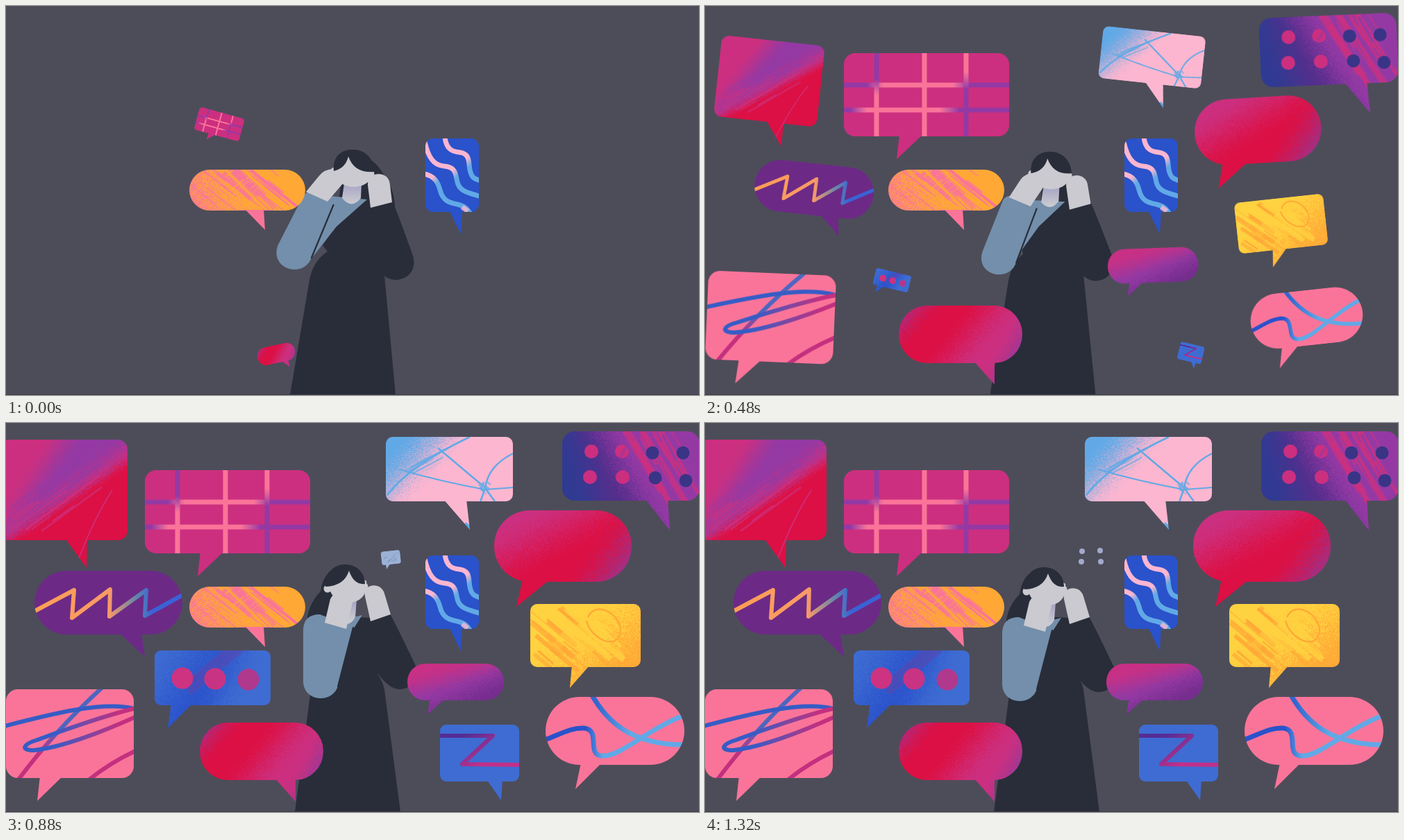
Animation, 998 px wide and 561 px high, one loop 1.36 s. Source, as an HTML page with a canvas:

```html
<!DOCTYPE html>
<html lang="en">
<head>
<meta charset="utf-8">
<title>Too many voices</title>
<style>
html, body { margin: 0; width: 100%; height: 100%; overflow: hidden; background: #4d4d59; }
canvas { display: block; }
</style>
</head>
<body>
<canvas id="stage" width="998" height="561"></canvas>
<script>
const LOOP = 1360, STEP = 40, PAD = 50;
const MAGENTA = '#cc2f7f', CRIMSON = '#dc1044', PURPLE = '#9439a4', PINK = '#fa7499', BLUE = '#3e6cd2',
  DEEP = '#2a52cb', SKY = '#61a9e6', ORANGE = '#ffa836', YELLOW = '#ffd23f', ROSE = '#fcb6d0', NAVY = '#3a3486',
  DARK = '#282d39', SKIN = '#cacad0', SLEEVE = '#738fab';
const ctx = document.getElementById('stage').getContext('2d');

let g, box; // context and bounds of the bubble being painted
let seed = 7;
const rand = () => (seed = seed * 16807 % 2147483647) / 2147483647;
const clamp = v => Math.max(0, Math.min(1, v));
const lerp = (a, b, p) => a + (b - a) * p;
const ease = p => { p = clamp(p); return p * p * (3 - 2 * p); };

function keyed(keys, t) {
  const i = keys.findIndex(k => k[0] > t);
  if (i < 0) return keys[keys.length - 1][1];
  if (i === 0) return keys[0][1];
  const [a, b] = [keys[i - 1], keys[i]];
  return lerp(a[1], b[1], (t - a[0]) / (b[0] - a[0]));
}

function disc(c, x, y, r, color) {
  c.fillStyle = color;
  c.beginPath();
  c.arc(x, y, r, 0, 7);
  c.fill();
}

// Grainy blend: nothing at the first point, full colour at the second.
function spray(color, x0, y0, x1, y1, noise = 0.55) {
  const dx = x1 - x0, dy = y1 - y0, len = dx * dx + dy * dy;
  g.fillStyle = color;
  for (let y = box.y; y < box.y + box.h + 45; y++) {
    for (let x = box.x; x < box.x + box.w; x++) {
      const d = ((x - x0) * dx + (y - y0) * dy) / len;
      const a = clamp(d + (rand() - 0.5) * noise);
      if (!a) continue;
      g.globalAlpha = a;
      g.fillRect(x, y, 1, 1);
    }
  }
  g.globalAlpha = 1;
}

function line(d, width, color, alpha = 1) {
  g.globalAlpha = alpha;
  g.lineWidth = width;
  g.strokeStyle = color;
  g.stroke(new Path2D(d));
  g.globalAlpha = 1;
}

function blend(x0, y0, x1, y1, ...stops) {
  const grad = g.createLinearGradient(x0, y0, x1, y1);
  stops.forEach(([at, color]) => grad.addColorStop(at, color));
  return grad;
}

// Dry brush marks along one direction, scattered over an area.
function brush(color, count, x, y, w, h, dx, dy, maxWidth) {
  for (let i = 0; i < count; i++) {
    const px = x + rand() * w, py = y + rand() * h, k = 0.3 + rand();
    line(`M${px} ${py}l${dx * k} ${dy * k}`, 0.5 + rand() * maxWidth, color, 0.45 + rand() * 0.5);
  }
}

// rect: x, y, w, h, radius; tail: left, right, tip x, tip y
const bubbles = [
  { rect: [-9, 24, 184, 145, 14], tail: [85, 117, 116, 209], start: 200, dir: -1, color: MAGENTA, art() {
    spray(PURPLE, 40, 56, 70, 76);
    spray(MAGENTA, 86, 82, 104, 106, 0.9);
    spray(CRIMSON, 90, 102, 98, 114, 0.8);
    brush(PURPLE, 8, -10, 120, 70, 45, 85, -62, 2);
    brush(MAGENTA, 10, 0, 135, 80, 25, 85, -62, 3);
    line('M153 97Q128 135 105 195', 1.5, MAGENTA);
  } },
  { rect: [200, 68, 238, 120, 16], tail: [280, 314, 276, 221], start: -100, dir: 1, color: MAGENTA, art() {
    const two = (y0, y1, a, b) => blend(0, y0, 0, y1, [0, a], [1, b]);
    const across = (a, b, c, d) => blend(200, 0, 438, 0, [a, PURPLE], [b, PINK], [c, PINK], [d, PURPLE]);
    line('M200 114H438', 7, across(0.14, 0.24, 0.66, 0.76));
    line('M200 150H438', 7, across(0.04, 0.14, 0.58, 0.7));
    line('M247 68V188', 7, two(105, 128, PURPLE, PINK));
    line('M316 68V188', 7, PINK);
    line('M376 68V188', 7, two(95, 120, PINK, PURPLE));
  } },
  { rect: [547, 20, 183, 93, 10], tail: [630, 663, 668, 154], start: 200, dir: -1, color: ROSE, art() {
    spray(SKY, 608, 72, 572, 38);
    line('M549 104Q580 62 668 20', 2.5, SKY);
    line('M622 36L692 95', 2.5, SKY);
    line('M566 67Q625 84 690 96L730 93', 2, SKY);
    line('M690 94Q694 62 730 44M690 94L704 113M690 94L683 114', 2.5, SKY);
    brush(SKY, 9, 570, 55, 30, 20, 45, -24, 2);
    brush(SKY, 12, 680, 85, 14, 12, 8, 7, 5);
    line('M660 146L672 156', 8, SKY);
  } },
  { rect: [801, 12, 198, 100, 18], tail: [920, 953, 956, 155], start: 75, dir: -1, color: '#303a92', art() {
    spray('#562d8c', 815, 70, 865, 55);
    spray(PURPLE, 868, 75, 905, 55);
    line('M912 5L985 125', 9, MAGENTA, 0.8);
    brush(MAGENTA, 14, 890, 0, 65, 30, 50, 84, 7);
    brush(PURPLE, 6, 920, 10, 60, 30, 40, 75, 4);
    [[843, 41], [887, 41], [841, 78], [888, 78]].forEach(([x, y]) => disc(g, x, y, 10, MAGENTA));
    [[931, 43], [975, 43], [935, 79], [979, 83]].forEach(([x, y]) => disc(g, x, y, 9.5, NAVY));
    line('M884 50L894 34', 4, PURPLE, 0.6);
  } },
  { rect: [703, 126, 198, 103, 51], tail: [744, 783, 735, 265], start: 145, dir: 1, color: CRIMSON, art() {
    spray(MAGENTA, 808, 182, 780, 128);
    spray('#8c3a9c', 848, 187, 902, 226);
  } },
  { rect: [41, 213, 213, 92, 46], tail: [162, 195, 200, 337], start: 200, dir: -1, color: '#6c2a86', art() {
    line('M38 273L98 241L95 281L150 240L149 279L202 241L200 278L258 246', 6,
      blend(41, 0, 254, 0, [0, '#ff9e55'], [0.5, '#fa9a66'], [0.7, '#5b84b0'], [0.8, '#3a62d6']));
  } },
  { rect: [264, 236, 167, 59, 29.5], tail: [343, 371, 373, 323], start: -999, dir: 1, color: ORANGE, art() {
    spray(PINK, 322, 250, 250, 285, 1);
    brush(PINK, 14, 312, 230, 22, 12, 60, 58, 7);
    brush(PINK, 26, 265, 225, 115, 40, 46, 36, 2.6);
    brush(ORANGE, 18, 265, 235, 90, 40, 30, -26, 1.8);
    line('M352 236L420 290', 4, PINK);
    g.fillStyle = PINK;
    g.fillRect(335, 294, 50, 30);
  } },
  { rect: [604, 191, 77, 106, 11], tail: [638, 657, 655, 329], start: -999, dir: 1, color: DEEP, art() {
    const fade = (x, y) => blend(x - 4, y - 4, x + 4, y + 4, [0, ROSE], [1, SKY]);
    line('M632 189C634 207 643 210 653 211C671 213 665 230 669 240C672 250 677 249 685 253', 7, fade(667, 224));
    line('M603 196C608 218 616 230 631 231C651 232 647 248 651 257C655 268 668 270 685 275', 7, fade(648, 240));
    line('M602 242C617 245 622 254 625 265C629 282 640 284 650 286C660 288 664 292 669 300', 7, fade(619, 250));
    line('M657 290L665 296', 7, ROSE, 0.8);
  } },
  { rect: [755, 261, 159, 91, 10], tail: [815, 841, 812, 382], start: 200, dir: 1, color: YELLOW, art() {
    spray(ORANGE, 840, 300, 880, 350, 1.2);
    brush(ORANGE, 22, 750, 265, 70, 70, 52, 44, 9);
    brush(YELLOW, 14, 780, 255, 60, 50, 60, 50, 8);
    brush(YELLOW, 8, 840, 275, 25, 20, 30, 26, 8);
    line('M838 280C850 255 885 275 885 300C882 330 842 312 836 285', 2.5, ORANGE);
  } },
  { rect: [214, 328, 167, 79, 9], tail: [238, 269, 233, 440], start: 310, dir: 1, color: BLUE, art() {
    spray(DEEP, 215, 350, 275, 390);
    spray(BLUE, 285, 380, 330, 400);
    line('M260 385L335 322', 20, '#5b45ac', 0.55);
    [[254, 368, '#cd3380'], [301, 369, '#c93383'], [349, 370, '#b0388d']].forEach(d => disc(g, d[0], d[1], 15.5, d[2]));
  } },
  { rect: [578, 347, 139, 53, 26], tail: [611, 633, 607, 420], start: 130, dir: 1, color: '#c73085', art() {
    spray(PURPLE, 640, 352, 648, 380);
    spray('#732c8c', 650, 376, 664, 408);
  } },
  { rect: [0, 384, 184, 128, 17], tail: [49, 82, 45, 545], start: 75, dir: 1, color: PINK, art() {
    const ink = '#365cc5', plum = '#c4307f';
    line('M138 382Q72 442 18 514', 6, blend(80, 440, 50, 480, [0, '#4d66c0'], [1, plum]));
    line('M-2 437C60 421 140 400 184 412', 6, ink);
    line('M186 424C140 445 80 468 40 472C20 472 25 463 45 457C90 440 150 420 184 412', 6,
      blend(70, 0, 165, 0, [0, ink], [1, plum]));
    line('M186 473Q150 490 120 514', 6, plum);
  } },
  { rect: [279, 432, 178, 83, 41], tail: [387, 417, 417, 546], start: -220, dir: -1, color: CRIMSON, art() {
    spray(MAGENTA, 362, 462, 398, 492);
    spray('#8c3a9c', 430, 482, 462, 500);
    spray('#9439a0', 316, 452, 282, 422);
  } },
  { rect: [625, 435, 114, 82, 9], tail: [692, 715, 713, 544], start: 310, dir: 1, color: BLUE, art() {
    line('M623 451H701L657 492L741 493', 6, blend(660, 452, 685, 492, [0, '#562d96'], [1, '#c0308a']));
  } },
  { rect: [777, 395, 200, 98, 49], tail: [828, 858, 820, 528], start: 200, dir: 1, color: PINK, art() {
    line('M776 457C800 448 815 439 832 440C858 442 835 478 858 480C885 482 920 443 978 421', 7,
      blend(835, 0, 860, 0, [0, DEEP], [1, SKY]));
    line('M843 391C865 430 900 465 979 464', 7, blend(850, 0, 900, 0, [0, '#3266cf'], [1, SKY]));
  } },
  { rect: [539, 181, 34, 24, 4], tail: [546, 555, 546, 213], start: 600, end: 1220, dir: 1, color: '#9cb1d6', art() {
    brush('#7488b2', 6, 539, 186, 24, 18, 16, -9, 1);
  } }
];

for (const b of bubbles) {
  const [x, y, w, h, r] = b.rect, [left, right, tipX, tipY] = b.tail;
  const canvas = document.createElement('canvas');
  canvas.width = w + 2 * PAD;
  canvas.height = h + 2 * PAD;
  g = canvas.getContext('2d');
  g.translate(PAD - x, PAD - y);
  g.lineJoin = 'round';
  box = { x, y, w, h };
  const shape = new Path2D();
  shape.roundRect(x, y, w, h, r);
  shape.moveTo(left, y + h - 3);
  shape.lineTo(right, y + h - 3);
  shape.lineTo(tipX, tipY);
  shape.closePath();
  g.fillStyle = b.color;
  g.fill(shape);
  g.globalCompositeOperation = 'source-atop';
  b.art();
  b.canvas = canvas;
  b.pivot = [(left + right) / 2, y + h - 4];
}

const SIZE = [[0, 0], [45, 0.25], [150, 0.31], [230, 0.31], [285, 0.86], [400, 1]];
const TILT = [[0, 18], [80, 16], [150, 14], [230, 12], [285, -8], [400, 2.5], [560, 0]];

function drawBubble(b, t) {
  const age = t - b.start, size = keyed(SIZE, age);
  if (size <= 0 || t >= (b.end || LOOP)) return;
  const [px, py] = b.pivot;
  ctx.save();
  ctx.translate(px, py);
  ctx.rotate(b.dir * keyed(TILT, age) * Math.PI / 180);
  ctx.scale(size, size);
  ctx.drawImage(b.canvas, b.rect[0] - PAD - px, b.rect[1] - PAD - py);
  ctx.restore();
}

// Each body part: the path while covering both ears, then while listening.
const parts = {
  hair: ['M490 212Q528 212 545 245Q560 265 560 292L478 292L482 258Z',
    'M490 206Q458 206 453 243Q434 262 433 290L500 292L496 258Z'],
  dress: ['M409 561L437 395Q442 368 463 354L456 345L476 315L518 278L552 282L546 330Q545 370 545 388L561 561Z',
    'M416 561L437 400Q440 385 440 370L452 350L476 290L505 280L550 282L535 362Q545 376 546 392L568 561Z'],
  chest: ['M466 274L520 279L476 318L440 364Z', 'M480 285L513 277L497 302L480 340Z'],
  arm: ['M520 292L556 280Q560 288 586 360C592 382 578 394 562 395Q550 395 543 387L520 330Z',
    'M512 284L552 274Q556 279 588 346C598 366 584 384 567 384Q552 384 535 361L505 330Z'],
  neck: ['M487 256L512 256L511 277Q498 294 484 277Z', 'M490 254L505 254L503 280Q496 294 484 288Z'],
  sleeve: ['M440 268Q431 268 428 274L392 344C383 366 400 380 415 380C428 380 436 373 440 363L473 284Z',
    'M452 276Q429 276 428 298L428 372C428 389 441 397 453 397C466 397 474 390 478 380L500 295Z'],
  seam: ['M471.5 287L440 363', 'M500 295L478 380'],
  palm: ['M432 268L450 246Q458 235 472 235L486 255L463 282Z', 'M459 288L467 254Q470 246 480 245L500 255L490 297Z'],
  face: ['M473 233L493 216L529 236C529 252 516 261 500 261C484 261 473 250 473 233Z',
    'M465 232L494 212L519 228C521 248 510 259 493 259C477 259 465 248 465 232Z'],
  fringe: ['M472 238C470 218 482 207 499 207C517 207 530 220 531 239Q502 242 493 217Q489 234 472 238Z',
    'M460 236C460 216 472 204 488 204C503 204 517 214 517 232Q501 234 494 213Q487 235 460 236Z'],
  hand: ['M525 291L521 258C520 238 552 236 553 258L556 283Z', 'M525 286L517 250C513 232 540 228 545 246L554 276Z']
};

function drawPerson(t) {
  const p = ease((t - 310) / 570);
  const morph = ([from, to]) => {
    const target = to.match(/[\d.]+/g);
    let i = 0;
    return new Path2D(from.replace(/[\d.]+/g, v => lerp(+v, +target[i++], p)));
  };
  const fill = (name, color) => {
    ctx.fillStyle = color;
    ctx.fill(morph(parts[name]));
  };
  const dip = 6 * Math.sin(Math.PI * p) + 4 * clamp((t - 880) / 420);
  const shade = ctx.createLinearGradient(0, 260, 0, 284);
  shade.addColorStop(0, '#aaa8c6');
  shade.addColorStop(1, SKIN);

  ctx.save();
  ctx.translate(0, dip);
  fill('hair', DARK);
  ctx.restore();
  fill('dress', DARK);

  ctx.save();
  ctx.translate(0, dip);
  fill('arm', DARK);
  fill('chest', SLEEVE);
  fill('neck', shade);
  fill('sleeve', SLEEVE);
  ctx.strokeStyle = DARK;
  ctx.lineWidth = 2.2;
  ctx.lineCap = 'round';
  ctx.stroke(morph(parts.seam));
  fill('palm', SKIN);
  disc(ctx, lerp(473, 463, p), lerp(238, 239, p), 5.5, SKIN);
  disc(ctx, lerp(525, 516, p), lerp(242, 236, p), 5.5, SKIN);
  fill('face', SKIN);
  fill('fringe', DARK);
  fill('hand', SKIN);
  ctx.restore();
}

function drawBurst(t) {
  if (t < 1220) return;
  const k = lerp(0.6, 1, clamp((t - 1220) / 100));
  for (const [x, y] of [[-13, -7], [13, -8], [-14, 8], [14, 8]]) {
    disc(ctx, 556 + x * k, 192 + y * k, 4, '#a3a9cc');
  }
}

function frame() {
  const t = Math.floor(performance.now() % LOOP / STEP) * STEP;
  ctx.fillStyle = '#4d4d59';
  ctx.fillRect(0, 0, 998, 561);
  drawPerson(t);
  bubbles.forEach(b => drawBubble(b, t));
  drawBurst(t);
  ctx.fillStyle = '#3c3c47';
  ctx.fillRect(0, 560, 998, 1);
  requestAnimationFrame(frame);
}
frame();
</script>
</body>
</html>
```
